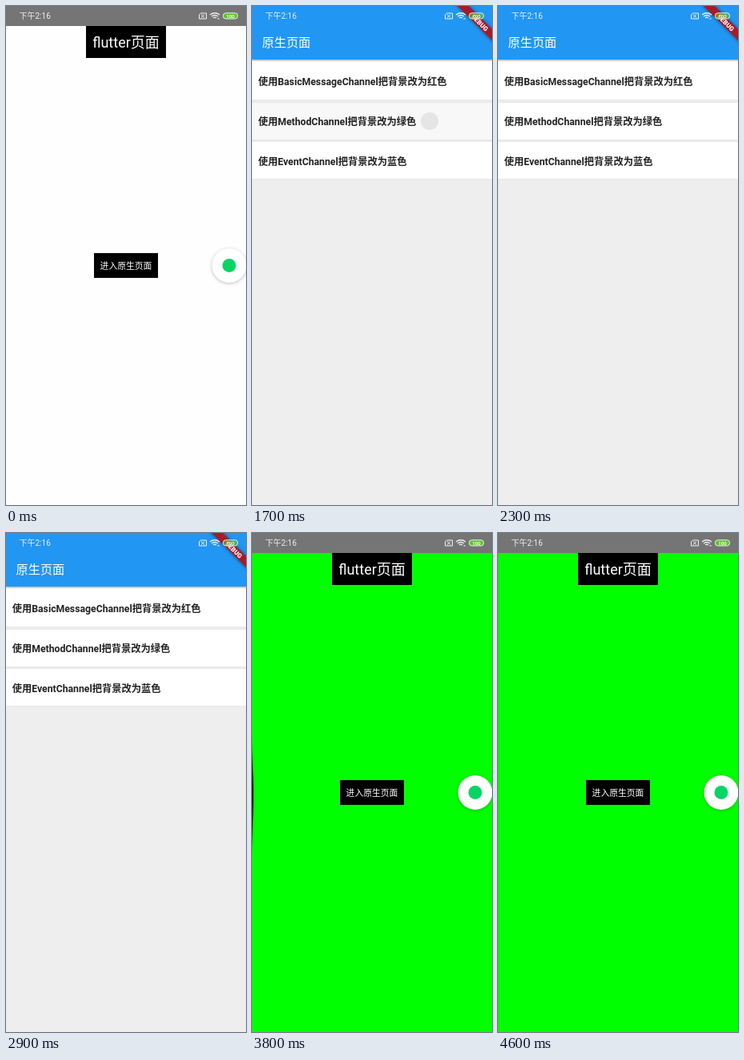
Write an HTML page that moves like this. It is 300 by 624 pixels and loops after 5000 ms.

```html
<!DOCTYPE html>
<html lang="zh-CN">
<head>
<meta charset="utf-8">
<style>
  html, body { margin: 0; width: 100%; height: 100%; overflow: hidden; background: #fff; }
  svg { display: block; width: 300px; height: 624px; }
  text { font-family: Roboto, 'Noto Sans CJK SC', 'Noto Sans CJK', sans-serif; fill: #fff; }
  .row { fill: #fff; filter: drop-shadow(0 .5px 1px rgba(0,0,0,.07)); }
  .label { font-size: 12.25px; font-weight: 700; fill: #222; }
  .bar { fill: #2196f3; filter: drop-shadow(0 1px 1px rgba(0,0,0,.25)); }
  .fab { fill: #fff; filter: drop-shadow(0 1.5px 2px rgba(0,0,0,.25)); }
  .banner { fill: #a31c2a; filter: drop-shadow(0 0 2px rgba(0,0,0,.5)); }
</style>
</head>
<body>
<svg viewBox="0 0 300 624">
  <clipPath id="rowClip"><rect y="121" width="300" height="46"/></clipPath>

  <g id="home">
    <rect id="backdrop" width="300" height="624"/>
    <rect width="300" height="25" fill="#757575"/>
    <rect x="100" y="25" width="100" height="40"/>
    <text x="150" y="52" font-size="18" text-anchor="middle">flutter页面</text>
    <rect x="110" y="309" width="80" height="31"/>
    <text x="150" y="328.8" font-size="10.8" text-anchor="middle">进入原生页面</text>
    <circle class="fab" cx="279" cy="324.5" r="21.5"/>
    <circle cx="279" cy="324.5" r="8.5" fill="#06d564"/>
    <path id="edge"/>
  </g>

  <g id="native">
    <rect width="300" height="624" fill="#eee"/>
    <g id="rows"></g>
    <g clip-path="url(#rowClip)">
      <rect id="highlight" y="121" width="300" height="46" fill="#bcbcbc"/>
      <circle id="splash" cx="222" cy="144" fill="#c8c8c8" fill-opacity=".4"/>
    </g>
    <g id="labels"></g>
    <rect class="bar" width="300" height="67"/>
    <text x="12.5" y="51.2" font-size="15.2">原生页面</text>
    <g transform="translate(282 18) rotate(45)">
      <rect class="banner" x="-34" y="-5" width="68" height="10"/>
      <text x="4" y="3" font-size="8" font-weight="900" text-anchor="middle">DEBUG</text>
    </g>
  </g>

  <g id="status" fill="none" stroke="#f2f2f2" stroke-width="1">
    <text x="16.5" y="16.4" font-size="10" stroke="none" style="fill:#f0f0f0">下午2:16</text>
    <path d="M243.5 9H250.5V16H241.5V11Z M244 10.7L248 14.5M248 10.7L244 14.5"/>
    <path d="M255 11Q261 6.5 267 11M257 13Q261 10 265 13M259 15Q261 13.4 263 15" stroke-width="1.3"/>
    <path d="M261 16.3h.1M264.5 15.8h2" stroke-width="1.3"/>
    <rect id="battery" x="271.5" y="8.8" width="18" height="7.2" rx="3.2" fill="#5cc22c"/>
    <text x="280.5" y="14.7" font-size="6.2" font-weight="700" text-anchor="middle" stroke="none">100</text>
  </g>
</svg>
<script>
const LOOP = 5000, STEP = 100;
const OPEN = 800, PRESS = 1650, RELEASE = 2200, BACK = 3800, EDGE_END = 4000;
const $ = id => document.getElementById(id);
const clamp = x => Math.max(0, Math.min(1, x));
const set = (id, attrs) => {
  for (const k in attrs) $(id).setAttribute(k, attrs[k]);
};
const show = (id, on) => set(id, { visibility: on ? 'visible' : 'hidden' });

const items = [
  [69, 48, '使用BasicMessageChannel把背景改为红色'],
  [121, 46, '使用MethodChannel把背景改为绿色'],
  [170, 46, '使用EventChannel把背景改为蓝色'],
];
$('rows').innerHTML = items.map(([y, h]) =>
  `<rect class="row" y="${y}" width="300" height="${h}"/>`).join('');
$('labels').innerHTML = items.map(([, , text], i) =>
  `<text class="label" x="7.7" y="${99.2 + i * 49.7}">${text}</text>`).join('');

function draw(t) {
  const native = t >= OPEN && t < BACK;
  show('home', !native);
  show('native', native);
  set('backdrop', { fill: t < OPEN ? '#fefefe' : '#0f0' });
  set('battery', { 'fill-opacity': native ? 0.6 : 1 });

  // Ink response while the second row is held
  const held = t >= PRESS && t < RELEASE ? t - PRESS : 0;
  set('highlight', { opacity: 0.4 * clamp(held / 200) });
  set('splash', { r: held * 0.2222 });

  // Back-gesture bulge retracting into the left edge
  const w = 4 * clamp((EDGE_END - t) / 200);
  const bulge = t >= BACK && w > 0;
  set('edge', { d: bulge ? `M0 254C0 290 ${w * 0.6} 300 ${w * 0.45} 335S0 380 0 416Z` : '', fill: '#111' });
}

function tick() {
  const t = performance.now() % LOOP;
  draw(Math.floor(t / STEP) * STEP);
  requestAnimationFrame(tick);
}
tick();
</script>
</body>
</html>
```
